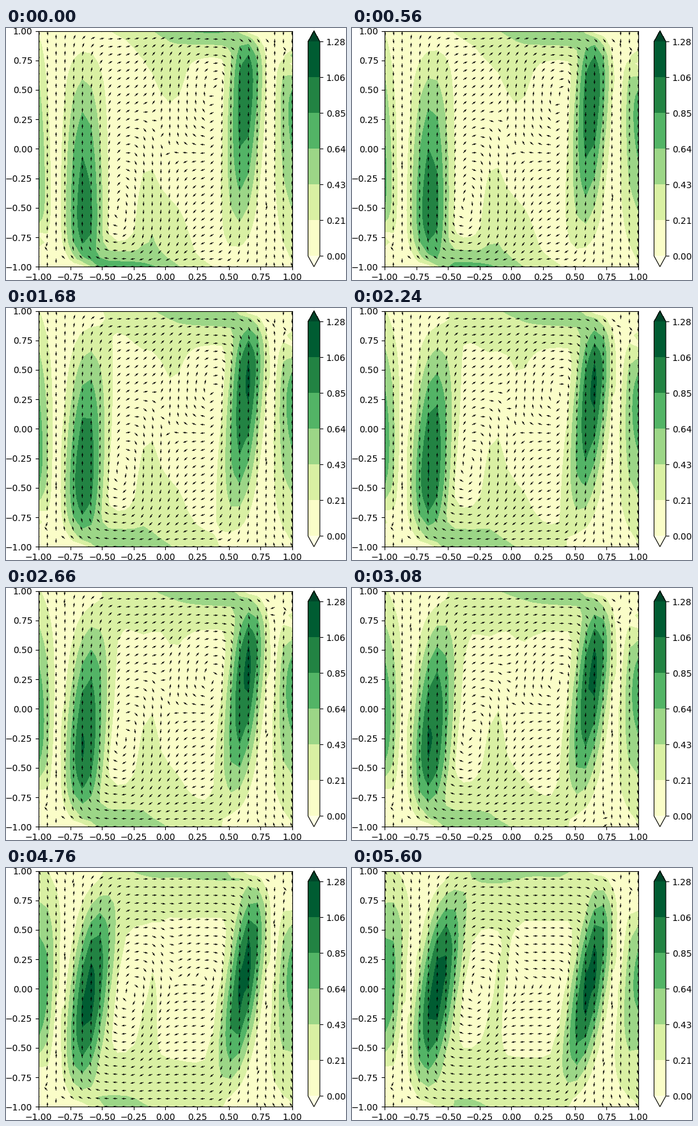
Write a matplotlib script that moves like this. It is 532 px wide and 395 px high and loops after 5.74 s.

```python
import numpy as np
import matplotlib.pyplot as plt
from matplotlib.animation import FuncAnimation

W, H, DPI = 532, 395, 100
FRAMES, INTERVAL = 41, 140
STEP = 0.01

axis = np.linspace(-1, 1, 30)
X, Y = np.meshgrid(axis, axis)
levels = np.linspace(0, 1.277, 7)

# Vertical jets: strength, centre, width
JETS = [(-0.77, -1.03, 0.135), (1, -0.62, 0.155), (-0.2, -0.12, 0.1),
        (-1, 0.61, 0.135), (0.64, 1.0, 0.14)]

r_tab = np.linspace(-1.3, 1.3, 2601)
profile = sum(a * np.exp(-((r_tab - c) / w) ** 2) for a, c, w in JETS)
potential = np.cumsum(profile) * (r_tab[1] - r_tab[0])
potential -= np.interp(-0.84, r_tab, potential)


def bump(y, p, q):
    """Envelope vanishing at both walls, skewed by the two exponents."""
    up = np.clip((1 + y) / 2, 0, 1.006)
    down = np.clip((1 - y) / 2, 0, 1.006)
    return (1 - up**p) * (1 - down**q)


def envelope(y, peak, p, q):
    return peak * bump(y, p, q) / bump(np.linspace(-1, 1, 201), p, q).max()


def stream(x, y, i):
    s = i / (FRAMES - 1)
    w = (1 + np.tanh(x / 0.22)) / 2
    tilt = (1 - w) * 0.14 * s + w * (0.05 + 0.11 * s)
    drift = (1 - w) * (0.02 - 0.055 * s)
    r = x + drift - tilt * (1 - 0.9 * x**6) * y
    ys = y + 0.2 * x**5
    p = 2.2 + 0.3 * s
    left = envelope(ys, 1 + 0.2 * s, p, 1 + 15 * np.exp(-0.06 * i))
    right = envelope(-ys, 1.04 + 0.15 * (1 - np.exp(-i / 18)), p,
                     1 + 12 * np.exp(-0.045 * i))
    return np.interp(r, r_tab, potential) * ((1 - w) * left + w * right)


def velocity(i):
    v = (stream(X + STEP, Y, i) - stream(X - STEP, Y, i)) / (2 * STEP)
    u = (stream(X, Y - STEP, i) - stream(X, Y + STEP, i)) / (2 * STEP)
    u *= (0.55 + 0.4 * Y**2) * (0.7 + 0.3 * i / (FRAMES - 1))
    return 0.75 * np.tanh(u / 0.75), v


def place(x, width, top=4.6, height=369.6):
    return [x / W, 1 - (top + height) / H, width / W, height / H]


fig = plt.figure(figsize=(W / DPI, H / DPI), dpi=DPI)
ax = fig.add_axes(place(51, 396.8))
cax = fig.add_axes(place(472.6, 18.48))


def fill(speed):
    return ax.contourf(X, Y, speed, levels, cmap="YlGn", extend="both", zorder=0)


u0, v0 = velocity(0)
speed0 = np.hypot(u0, v0) + 1e-9
state = {"fill": fill(speed0)}
arrows = ax.quiver(X, Y, u0 / speed0, v0 / speed0)
fig.colorbar(state["fill"], cax=cax, format="%.2f")

ticks = np.linspace(-1, 1, 9)
ax.set(xlim=(-1, 1), ylim=(-1, 1), xticks=ticks, yticks=ticks)


def update(i):
    u, v = velocity(i)
    speed = np.hypot(u, v) + 1e-9
    state["fill"].remove()
    state["fill"] = fill(speed)
    arrows.set_UVC(u / speed, v / speed)
    return []


anim = FuncAnimation(fig, update, frames=FRAMES, interval=INTERVAL,
                     repeat=True, repeat_delay=0, blit=False)
plt.show()
```
